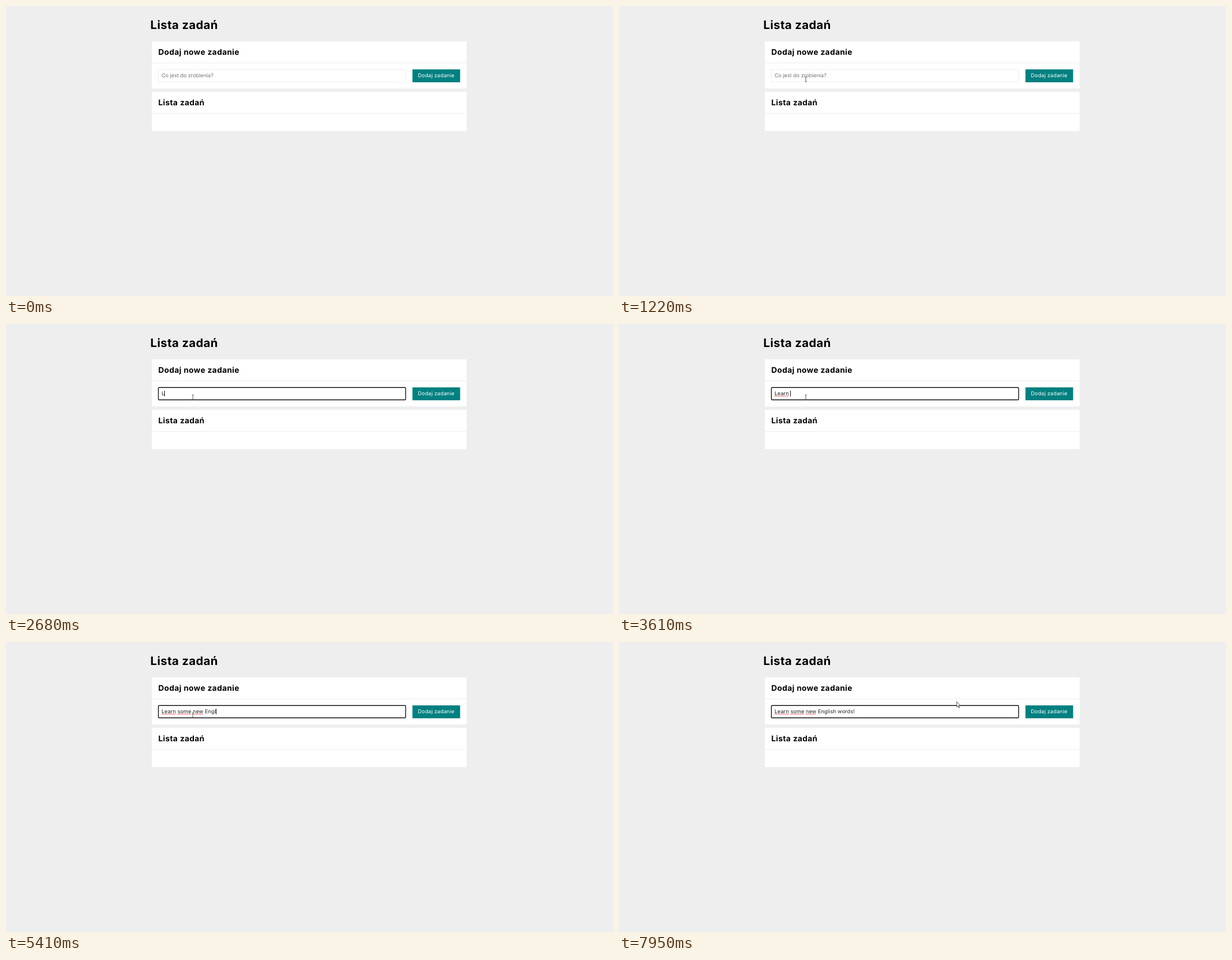
An HTML page for the animation above (8000 ms loop, 1082 by 517 pixels).

```html
<!DOCTYPE html>
<html lang="pl">
<head>
<meta charset="utf-8">
<title>Lista zadań</title>
<style>
  html, body { margin: 0; width: 100%; height: 100%; overflow: hidden; background: #eee; }
  svg { display: block; width: 100%; height: 100%; }
  text {
    font: 9.33px Inter, sans-serif;
    font-optical-sizing: none;
    text-rendering: geometricPrecision;
    white-space: pre;
  }
  .title { font-size: 20.8px; font-weight: 700; letter-spacing: .021em; }
  .head { font-size: 14px; font-weight: 700; letter-spacing: .029em; }
  #typed { letter-spacing: .012em; fill: #222; }
  #label { letter-spacing: .02em; fill: #fff; }
  #hint { fill: #757575; }
  #field { fill: #fff; stroke: #eee; }
  #field.focused { stroke: #101010; stroke-width: 1.4px; rx: 1.5px; }
</style>
</head>
<body>
<svg viewBox="0 0 1082 517">
  <text class="title" x="257.3" y="41.3">Lista zadań</text>

  <path fill="#fff" d="M260 63h561v84h-561zM260 153h561v70h-561z"/>
  <path fill="#eee" d="M260 101h561v1h-561zM260 191h561v1h-561z"/>
  <text class="head" x="271.5" y="87">Dodaj nowe zadanie</text>
  <text class="head" x="271.5" y="177">Lista zadań</text>

  <rect id="field" x="271.6" y="113.3" width="440.8" height="22"/>
  <text id="hint" x="277.2" y="127">Co jest do zrobienia?</text>
  <text id="typed" x="277.2" y="127"></text>
  <path id="waves" fill="none" stroke="#e8202a" stroke-width=".8"/>
  <rect id="caret" y="119" width="1" height="10"/>

  <rect x="724.5" y="113" width="85" height="23" fill="#008080"/>
  <text id="label" x="734.2" y="127">Dodaj zadanie</text>

  <path id="arrow" fill="#fff" stroke="#222" stroke-width=".8" stroke-linejoin="round"
        d="M.4.4v9.4l2.2-2 1.6 3.5 1.4-.6-1.6-3.4h2.6z"/>
  <path id="beam" fill="none" stroke="#444" stroke-width=".9"
        d="M-1.5-4.5h3M0-4.5v8.5M-1.5 4h3"/>
</svg>
<script>
const LOOP = 8000, FOCUS = 1290, BLINK = 530;
const LEFT = 277.2;

// Bursts of typing: text, start, time per key
const BURSTS = [
  ['Learn ', 2480, 226], ['some ', 3680, 85], ['new ', 4150, 90],
  ['English ', 4950, 140], ['wor', 6070, 100], ['ds!', 6470, 235]
];
const MISSPELLED = /\b(Learn|some|new)(?= )/g;

// Pointer turning points: time, x, y
const ENTER = 120, TICK = 68;
const TURNS = [
  [ENTER, 930, 462], [430, 205, 150], [670, 375, 84], [800, 366, 98],
  [1150, 333, 131], [7680, 333, 131], [7950, 602, 106]
];

const $ = id => document.getElementById(id);
const show = (el, on) => el.setAttribute('display', on ? 'inline' : 'none');
const easeOut = f => f * (2 - f);

function typedAt(t) {
  let text = '', lastKey = FOCUS;
  for (const [part, start, step] of BURSTS) {
    if (t < start) break;
    const n = Math.min(part.length, Math.floor((t - start) / step) + 1);
    text += part.slice(0, n);
    lastKey = start + (n - 1) * step;
  }
  return { text, lastKey };
}

function wave(from, to) {
  let d = `M${from} 129.4`;
  for (let x = from + 1.4, up = true; x <= to; x += 1.4, up = !up) d += `L${x} ${up ? 128 : 129.4}`;
  return d;
}

function drawField(t) {
  const { text, lastKey } = typedAt(t);
  const typed = $('typed');
  typed.textContent = text;
  show($('hint'), !text);
  $('field').classList.toggle('focused', t >= FOCUS);

  let d = '';
  for (const { 0: word, index } of text.matchAll(MISSPELLED)) {
    const end = index + word.length - 1;
    d += wave(typed.getStartPositionOfChar(index).x, typed.getEndPositionOfChar(end).x);
  }
  $('waves').setAttribute('d', d);

  // The caret restarts its blink at every key
  const width = text ? typed.getComputedTextLength() : 0;
  $('caret').setAttribute('x', Math.floor(LEFT + width));
  show($('caret'), t >= FOCUS && Math.floor((t - lastKey) / BLINK) % 2 === 0);
}

function pointerAt(t) {
  const now = ENTER + Math.floor((t - ENTER) / TICK) * TICK;
  const i = Math.max(1, TURNS.findIndex(p => p[0] > now));
  const [t0, x0, y0] = TURNS[i - 1], [t1, x1, y1] = TURNS[i];
  const f = easeOut((now - t0) / (t1 - t0));
  return [x0 + (x1 - x0) * f, y0 + (y1 - y0) * f];
}

function drawPointer(t) {
  const [x, y] = pointerAt(t);
  const inField = x > 271 && x < 713 && y > 112 && y < 136;
  show($('arrow'), t >= ENTER && !inField);
  show($('beam'), t >= ENTER && inField);
  for (const id of ['arrow', 'beam']) $(id).setAttribute('transform', `translate(${x} ${y})`);
}

const begin = performance.now();
function frame() {
  const t = (performance.now() - begin) % LOOP;
  drawField(t);
  drawPointer(t);
  requestAnimationFrame(frame);
}
frame();
</script>
</body>
</html>
```
